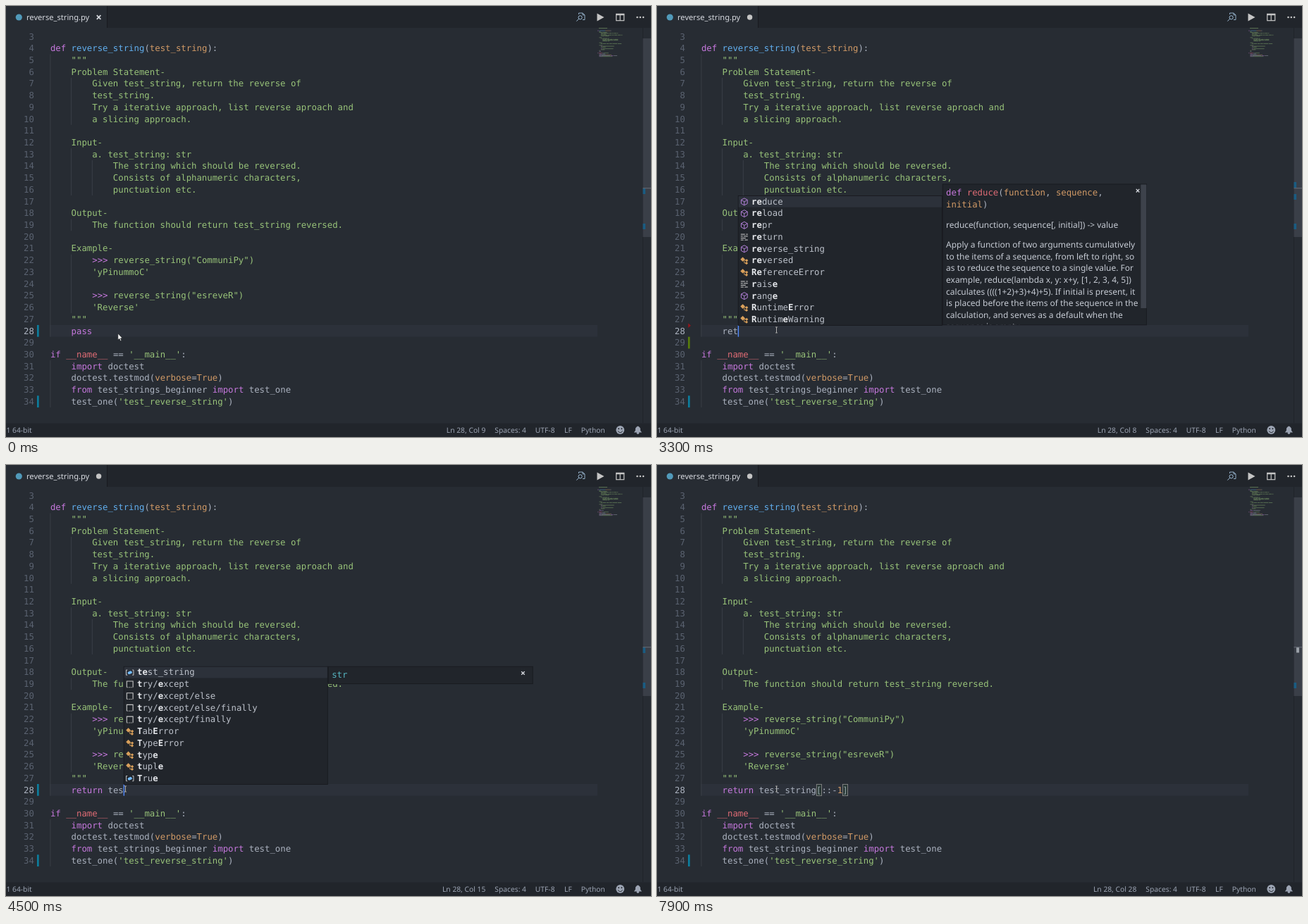
Write an HTML page with a canvas that moves like this. It is 915 px wide and 612 px high and loops after 8 s.

```html
<!DOCTYPE html>
<html lang="en">
<head>
<meta charset="utf-8">
<title>Editor typing loop</title>
<style>
html, body { margin: 0; width: 915px; height: 612px; overflow: hidden; background: #272c33; }
canvas { display: block; }
</style>
</head>
<body>
<canvas id="stage" width="915" height="612"></canvas>
<script>
const ctx = document.getElementById('stage').getContext('2d');
const LOOP = 8000, CHAR = 7.417, LINE = 16.72, LEFT = 62.9, ROW = 28;
const MONO = '12.32px "DejaVu Sans Mono", monospace';
const sans = size => `${size}px "Noto Sans", "Open Sans", sans-serif`;
const INK = { w: '#abb2bf', g: '#98c379', p: '#c678dd', b: '#61afef', o: '#d19a66', r: '#e06c75', c: '#56b6c2' };
const BLUE = '#0c7d9d', GREEN = '#587c0c', RED = '#94151b';

// "~x" switches to colour x
const code = [
  '~pdef ~breverse_string~w(~otest_string~w):',
  '~g    """',
  '~g    Problem Statement-',
  '~g        Given test_string, return the reverse of',
  '~g        test_string.',
  '~g        Try a iterative approach, list reverse aproach and',
  '~g        a slicing approach.',
  '',
  '~g    Input-',
  '~g        a. test_string: str',
  '~g            The string which should be reversed.',
  '~g            Consists of alphanumeric characters,',
  '~g            punctuation etc.',
  '',
  '~g    Output-',
  '~g        The function should return test_string reversed.',
  '',
  '~g    Example-',
  '~g        ~p>>> ~greverse_string("CommuniPy")',
  "~g        'yPinummoC'",
  '',
  '~g        ~p>>> ~greverse_string("esreveR")',
  "~g        'Reverse'",
  '~g    """',
  '',
  '',
  "~pif ~r__name__ ~w== ~g'__main__'~w:",
  '~p    import ~wdoctest',
  '~w    doctest.testmod(~overbose~w=~oTrue~w)',
  '~p    from ~wtest_strings_beginner ~pimport ~wtest_one',
  "~w    test_one(~g'test_reverse_string'~w)"
];
// column, first line, last line
const guides = [[0, 5, 28], [0, 31, 34], [4, 7, 10], [4, 13, 16], [4, 19, 19], [4, 22, 26], [8, 14, 16]];

// "*" toggles bold; the first letter names the icon
const matchRe = { items: ['m*re*duce', 'm*re*load', 'm*re*pr', 'k*re*turn', 'm*re*verse_string', 'c*re*versed',
  'c*Re*ferenceError', 'k*r*ais*e*', 'm*r*ang*e*', 'c*R*untime*E*rror', 'c*R*untim*e*Warning'], doc: 'reduce' };
const matchTe = { items: ['v*te*st_string', 's*t*ry/*e*xcept', 's*t*ry/*e*xcept/else', 's*t*ry/*e*xcept/else/finally',
  's*t*ry/*e*xcept/finally', 'c*T*ab*E*rror', 'c*T*ype*E*rror', 'c*t*yp*e*', 'c*t*upl*e*', 'v*T*ru*e*'], doc: 'str' };
const matchTes = { items: ['v*tes*t_string', 's*t*ry/*e*xcept/el*s*e', 's*t*ry/*e*xcept/el*s*e/finally'], doc: 'str' };
const only = item => ({ items: [item] });

const NAME = 'return test_string';
const typed = [[0, 'pass'], [2400, ''], [2800, 'r'], [3200, 're'], [3300, 'ret'], [3400, 'retu'], [3500, 'retur'],
  [3600, 'return'], [3800, 'return '], [4200, 'return t'], [4300, 'return te'], [4500, 'return tes'],
  [4600, 'return test'], [4800, NAME], [5800, NAME + '[]'], [6600, NAME + '[:]'], [6700, NAME + '[::]'],
  [7300, NAME + '[::-]'], [7400, NAME + '[::-1]']];
const carets = [[0, 0], [700, 1], [1100, 0], [1500, 1], [2100, 0], [2400, 1], [5400, 0], [5800, 1],
  [6400, 0], [6600, 1], [7100, 0], [7300, 1], [7900, 0]];
const diffs = [[0, 'modified'], [2700, 'removed'], [4000, 'modified'], [7500, 'clean']];
const popups = [[0, null], [3300, matchRe], [3400, only('k*ret*urn')], [3500, only('k*retu*rn')],
  [3600, only('k*retur*n')], [3800, null], [4400, matchTe], [4600, matchTes], [4800, null]];
const pointers = [[0, null], [100, [162, 467]], [200, [162, 463]], [1500, [166, 461]], [1600, [169.5, 460]]];

const at = (track, t) => track.findLast(step => step[0] <= t)[1];
const colX = col => LEFT + col * CHAR;
const lineTop = n => 453 + (n - ROW) * LINE;
const baseline = n => 465.5 + (n - ROW) * LINE;

function rect(x, y, w, h, color) {
  ctx.fillStyle = color;
  ctx.fillRect(x, y, w, h);
}
function text(str, x, y, color, font, align = 'left') {
  ctx.font = font;
  ctx.textAlign = align;
  ctx.fillStyle = color;
  ctx.fillText(str, x, y);
}
function stroke(color, width, ...paths) {
  ctx.strokeStyle = color;
  ctx.lineWidth = width;
  ctx.beginPath();
  for (const [x, y, ...rest] of paths) {
    ctx.moveTo(x, y);
    for (let i = 0; i < rest.length; i += 2) ctx.lineTo(rest[i], rest[i + 1]);
  }
  ctx.stroke();
}
function fill(color, ...points) {
  ctx.fillStyle = color;
  ctx.beginPath();
  for (let i = 0; i < points.length; i += 2) ctx.lineTo(points[i], points[i + 1]);
  ctx.fill();
}
function disc(x, y, r, color) {
  ctx.fillStyle = color;
  ctx.beginPath();
  ctx.arc(x, y, r, 0, 7);
  ctx.fill();
}
function cross(x, y, r, width) {
  stroke('#d7dae0', width, [x - r, y - r, x + r, y + r], [x - r, y + r, x + r, y - r]);
}
function spans(line) {
  let col = 0;
  return line.split('~').slice(1).map(part => {
    const span = { color: INK[part[0]], str: part.slice(1), col };
    col += span.str.length;
    return span;
  });
}
function drawSpans(line, x, y) {
  for (const { color, str, col } of spans(line)) text(str, x + col * CHAR, y, color, MONO);
}
function markTyped(str) {
  const body = str.replace(/^(pass$|return(?= ))/, '~p$1~w').replace(/(\d)/, '~o$1~w');
  return '~w    ' + body;
}

function drawMinimap(lines) {
  ctx.globalAlpha = 0.5;
  rect(841, 31, 12, 0.9, INK.g);
  lines.forEach((line, i) => {
    for (const { color, str, col } of spans(line))
      for (const word of str.matchAll(/\S+/g))
        rect(839 + (col + word.index) * 0.61, 34.7 + i * 1.22, word[0].length * 0.61, 0.8, color);
  });
  ctx.globalAlpha = 1;
}

function drawCode(lines) {
  rect(62, lineTop(ROW), 777, LINE, '#2c313a');
  for (const [col, from, to] of guides)
    rect(colX(col) - 0.4, lineTop(from), 0.9, (to - from + 1) * LINE, '#3b4048');
  for (let n = 3; n <= 34; n++)
    text(n, 39.8, baseline(n), n === ROW ? '#abb2bf' : '#5a6270', MONO, 'right');
  lines.forEach((line, i) => drawSpans(line, LEFT, baseline(i + 4)));
}

function drawDiff(diff) {
  const bar = (n, color) => rect(44, lineTop(n), 2.7, LINE, color);
  bar(34, BLUE);
  if (diff === 'modified') bar(ROW, BLUE);
  if (diff === 'removed') {
    bar(29, GREEN);
    fill(RED, 44.3, 450.5, 48, 453.7, 44.3, 457);
  }
}

function drawRuler(diff, bracket) {
  rect(903, 31, 0.9, 561, '#20242a');
  rect(903.5, 46, 11.5, 282, '#3a3f48');
  const mark = y => rect(903.5, y, 3.6, 8, '#1a5c82');
  mark(309);
  if (diff === 'modified') mark(259);
  if (diff === 'removed') { mark(250); mark(267); }
  if (bracket) rect(907, 259, 4, 7.5, '#9aa0a8');
  rect(903.5, 258, 11.5, 1.3, '#5c626c');
}

function drawTabs(dirty) {
  rect(0, 0, 915, 31, '#21252b');
  rect(0, 0, 143, 31, '#272c33');
  rect(143, 0, 0.9, 31, '#181a1f');
  disc(18.3, 16, 4.6, '#519aba');
  text('reverse_string.py', 29, 19.8, '#d7dae0', sans(11.13));
  if (dirty) disc(131.6, 16, 3.7, '#c5c5c5');
  else cross(131.6, 16, 2.8, 1.7);

  const grey = '#c5c5c5', pale = '#9fbdd6';
  stroke(pale, 0.9, [812.5, 12, 812.5, 10, 818, 10, 821, 12.8, 821, 19.5, 818, 19.5], [818, 10, 818, 12.8, 821, 12.8]);
  ctx.lineWidth = 1;
  ctx.beginPath();
  ctx.arc(814.6, 16.3, 2.6, 0, 7);
  ctx.moveTo(812.7, 18.2);
  ctx.lineTo(809.3, 21.6);
  ctx.stroke();
  fill(grey, 838.5, 10.5, 848.5, 16, 838.5, 21.5);
  ctx.strokeStyle = grey;
  ctx.lineWidth = 1.2;
  ctx.strokeRect(865.7, 11.5, 11, 9.2);
  rect(865.2, 10.8, 12, 2.4, grey);
  rect(870.6, 11, 1.2, 10, grey);
  for (const x of [895.5, 899.8, 904.1]) disc(x, 16, 1.3, grey);
}

function drawStatus(column) {
  const color = '#9da5b4', font = sans(10.27), y = 606.2;
  rect(0, 592.6, 915, 19.4, '#21252b');
  text('1 64-bit', 0.5, y, color, font);
  text(`Ln ${ROW}, Col ${column}`, 680.3, y, color, font, 'right');
  text('Spaces: 4', 693.3, y, color, font);
  text('UTF-8', 750.8, y, color, font);
  text('LF', 792, y, color, font);
  text('Python', 815.8, y, color, font);
  disc(871.3, 602, 5.9, color);
  disc(869.2, 600.3, 1, '#21252b');
  disc(873.4, 600.3, 1, '#21252b');
  ctx.strokeStyle = '#21252b';
  ctx.lineWidth = 1;
  ctx.beginPath();
  ctx.arc(871.3, 602.4, 3.2, 0.3, 2.84);
  ctx.stroke();
  fill(color, 890.8, 605.5, 892.8, 603, 893, 599.5, 894.7, 597.4, 896.4, 596.4, 898.1, 597.4, 899.8, 599.5, 900, 603, 902, 605.5);
  disc(896.4, 606.2, 1.7, color);
}

const icons = {
  m(x, y) {
    stroke('#b180d7', 1, [x, y - 5, x + 4.4, y - 2.6, x + 4.4, y + 2.6, x, y + 5, x - 4.4, y + 2.6, x - 4.4, y - 2.6, x, y - 5],
      [x - 4.4, y - 2.6, x, y, x + 4.4, y - 2.6], [x, y, x, y + 5]);
  },
  k(x, y) {
    for (const [dx, dy, w] of [[-5, -4, 6], [2.5, -4, 2.5], [-5, -1.3, 3], [-1, -1.3, 6], [-5, 1.4, 7], [-5, 4, 4], [0.5, 4, 4.5]])
      rect(x + dx, y + dy - 0.5, w, 1.1, '#c5c5c5');
  },
  c(x, y) {
    const gem = (cx, cy, r) => fill('#d9a05b', cx - r, cy, cx, cy - r, cx + r, cy, cx, cy + r);
    gem(x - 2.2, y - 1.8, 3.3);
    gem(x + 3.4, y - 0.2, 2.1);
    gem(x + 3.2, y + 3.6, 2.1);
    stroke('#d9a05b', 0.9, [x - 1, y - 0.6, x + 3, y - 0.6], [x, y, x, y + 3.4, x + 3, y + 3.4]);
  },
  v(x, y) {
    stroke('#c5c5c5', 1, [x - 3.5, y - 3.6, x - 5.2, y - 3.6, x - 5.2, y + 3.6, x - 3.5, y + 3.6],
      [x + 3.5, y - 3.6, x + 5.2, y - 3.6, x + 5.2, y + 3.6, x + 3.5, y + 3.6]);
    fill('#75beff', x - 3, y - 0.5, x + 0.8, y - 2.4, x + 3, y - 1.2, x + 3, y + 0.8, x - 0.8, y + 2.6, x - 3, y + 1.5);
  },
  s(x, y) {
    stroke('#c5c5c5', 1.1, [x - 4.4, y + 4.2, x - 4.4, y - 4.4, x + 4.4, y - 4.4, x + 4.4, y + 4.2]);
    ctx.setLineDash([1.5, 1.2]);
    stroke('#c5c5c5', 1.1, [x - 4.4, y + 4.4, x + 4.4, y + 4.4]);
    ctx.setLineDash([]);
  }
};

function panel(x, y, w, h) {
  rect(x, y, w, h, '#181a1f');
  rect(x + 0.9, y + 0.9, w - 1.8, h - 1.8, '#21252b');
}

function drawReduceDoc(x) {
  const y = 252.5, h = 200.8, left = x + 5.3, font = sans(11.95);
  panel(x, y, 290, h);
  ctx.save();
  ctx.beginPath();
  ctx.rect(x, y, 290, h - 1);
  ctx.clip();
  drawSpans('~pdef ~rreduce~w(~ofunction~w, ~osequence~w,', left, 269.3);
  drawSpans('~oinitial~w)', left, 269.3 + LINE);
  const color = '#c5cad3';
  text('reduce(function, sequence[, initial]) -> value', left, 314.6, color, font);
  const prose = [
    'Apply a function of two arguments cumulatively',
    'to the items of a sequence, from left to right, so',
    'as to reduce the sequence to a single value. For',
    'example, reduce(lambda x, y: x+y, [1, 2, 3, 4, 5])',
    'calculates ((((1+2)+3)+4)+5). If initial is present, it',
    'is placed before the items of the sequence in the',
    'calculation, and serves as a default when the',
    'sequence is empty.'];
  prose.forEach((line, i) => text(line, left, 343.3 + i * 16.57, color, font));
  ctx.restore();
  rect(x + 281.5, y + 1, 8, 175.5, '#3d424b');
  cross(x + 277.2, y + 9.7, 2.3, 1.3);
}

function drawPopup({ items, doc }, x) {
  const h = items.length * LINE + 1;
  const above = items.length > 6;
  const y = lineTop(above ? ROW - items.length : ROW + 1);
  panel(x, y, 290, h);
  rect(x + 0.9, y + 0.9, 288.2, LINE - 1, '#2c313a');
  items.forEach((item, i) => {
    const mid = y + (i + 0.5) * LINE;
    icons[item[0]](x + 9, mid + 0.5);
    let col = 0;
    item.slice(1).split('*').forEach((part, k) => {
      const bold = k % 2;
      text(part, x + 19.3 + col * CHAR, mid + 4.3, bold ? '#e6e8ec' : '#bcc1ca', bold ? 'bold ' + MONO : MONO);
      col += part.length;
    });
  });
  if (doc === 'reduce') drawReduceDoc(x + 290);
  if (doc === 'str') {
    panel(x + 290, y, 291, 25.3);
    text('str', x + 295.4, y + 16.5, INK.c, MONO);
    cross(x + 566.7, y + 9.7, 2.3, 1.3);
  }
}

function drawPointer(pos) {
  if (!pos) {
    const shape = [158.8, 465, 158.8, 474.3, 160.9, 472.4, 162.3, 475.8, 163.9, 475.1, 162.5, 471.9, 165.2, 471.7];
    fill('#ffffff', ...shape);
    stroke('#15181c', 0.7, [...shape, 158.8, 465]);
    return;
  }
  const [x, y] = pos;
  const beam = [[x, y - 3.8, x, y + 3.8], [x - 1.5, y - 4, x + 1.5, y - 4], [x - 1.5, y + 4, x + 1.5, y + 4]];
  stroke('#15181c', 1.5, ...beam);
  stroke('#c8c8c8', 0.9, ...beam);
}

function draw(t) {
  const str = at(typed, t), diff = at(diffs, t), popup = at(popups, t);
  const open = str.indexOf('['), close = str.indexOf(']');
  const column = 4 + (close < 0 ? str.length : close);
  const lines = code.slice();
  lines[ROW - 4] = markTyped(str);

  rect(0, 0, 915, 612, '#272c33');
  drawCode(lines);
  drawDiff(diff);
  drawMinimap(lines);
  drawRuler(diff, t >= 5900);
  drawTabs(t >= 2400);
  drawStatus(column + 1);
  if (open >= 0) {
    for (const i of [open, close]) {
      rect(colX(4 + i), lineTop(ROW), CHAR, LINE, 'rgba(0,100,0,.1)');
      ctx.strokeStyle = '#888888';
      ctx.lineWidth = 0.9;
      ctx.strokeRect(colX(4 + i) + 0.3, lineTop(ROW) + 0.4, CHAR - 0.3, LINE - 0.5);
    }
  }
  if (at(carets, t)) rect(colX(column) - 0.1, lineTop(ROW), 1.4, LINE, '#528bff');
  if (popup) drawPopup(popup, colX(column));
  drawPointer(at(pointers, t));
}

ctx.textRendering = 'geometricPrecision';
function frame() {
  draw(performance.now() % LOOP);
  requestAnimationFrame(frame);
}
frame();
</script>
</body>
</html>
```
